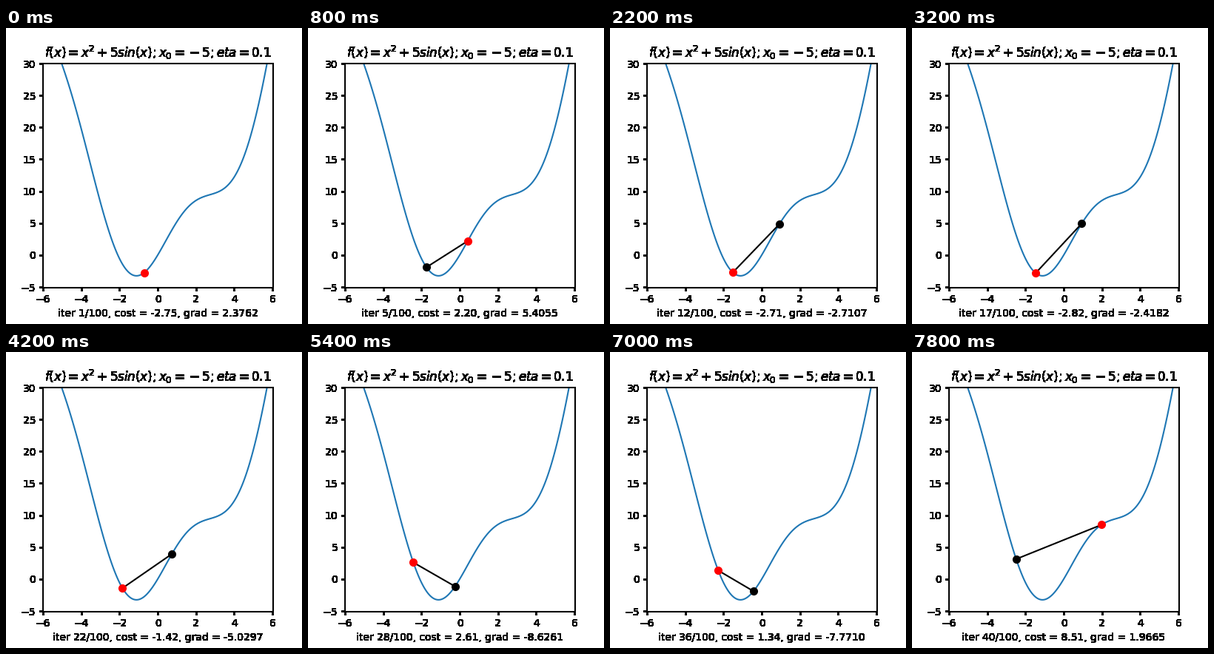
These frames come from a looping animation (400 px wide and 400 px high, 8000 ms). A matplotlib script:

```python
import numpy as np
import matplotlib.pyplot as plt
from matplotlib.animation import FuncAnimation

STEPS = 40
TOTAL = 100
RATE = 0.5
BOX = [0.125, 0.125, 0.775, 0.755]
TITLE = r"$f(x) = x^2 + 5sin(x); x_0 = -5; eta = 0.1$"


def cost(x):
    return x**2 + 5 * np.sin(x)


def grad(x):
    return 2 * x + 5 * np.cos(x)


def descend(x, count):
    path = []
    for _ in range(count):
        x = x - RATE * grad(x)
        path.append(x)
    return np.array(path)


def harden(img, dpi):
    """Turn every touched pixel solid black, so edges have no smoothing."""
    out = np.zeros_like(img)
    out[..., 3] = img[..., 3] > 0
    return out, 0, 0


plt.rcParams.update({"font.family": "DejaVu Sans", "font.size": 10,
                     "mathtext.fontset": "dejavusans",
                     "path.simplify": False})
fig = plt.figure(figsize=(4, 4), dpi=100, facecolor="white")

# Hard-edged lettering, ticks and outer border
frame = fig.add_axes(BOX, facecolor="none", xlim=(-6, 6), ylim=(-5, 30))
frame.set_xticks(range(-6, 7, 2))
frame.set_yticks(range(-5, 31, 5))
frame.set_title(TITLE)
frame.set_agg_filter(harden)

# Smooth plot on a white ground
ax = fig.add_axes(BOX, facecolor="white", xlim=(-6, 6), ylim=(-5, 30),
                  xticks=[], yticks=[])
ax.set_autoscale_on(False)
xs = np.linspace(-6, 6, 1000)
ax.plot(xs, cost(xs), color="#1f77b4", lw=1.5)
link, = ax.plot([], [], "k-", lw=1.5)
last, = ax.plot([], [], "ko", ms=7)
now, = ax.plot([], [], "ro", ms=7)

path = descend(-5.0, STEPS)
heights = cost(path)


def update(i):
    x, y = path[i], heights[i]
    start = max(i - 1, 0)
    link.set_data(path[start:i + 1], heights[start:i + 1])
    last.set_data(path[start:i], heights[start:i])
    now.set_data([x], [y])
    frame.set_xlabel(f"iter {i + 1}/{TOTAL}, cost = {y:.2f}, "
                     f"grad = {grad(x):.4f}")
    return link, last, now


anim = FuncAnimation(fig, update, frames=STEPS, interval=200,
                     repeat=True, repeat_delay=0, blit=False)
plt.show()
```
